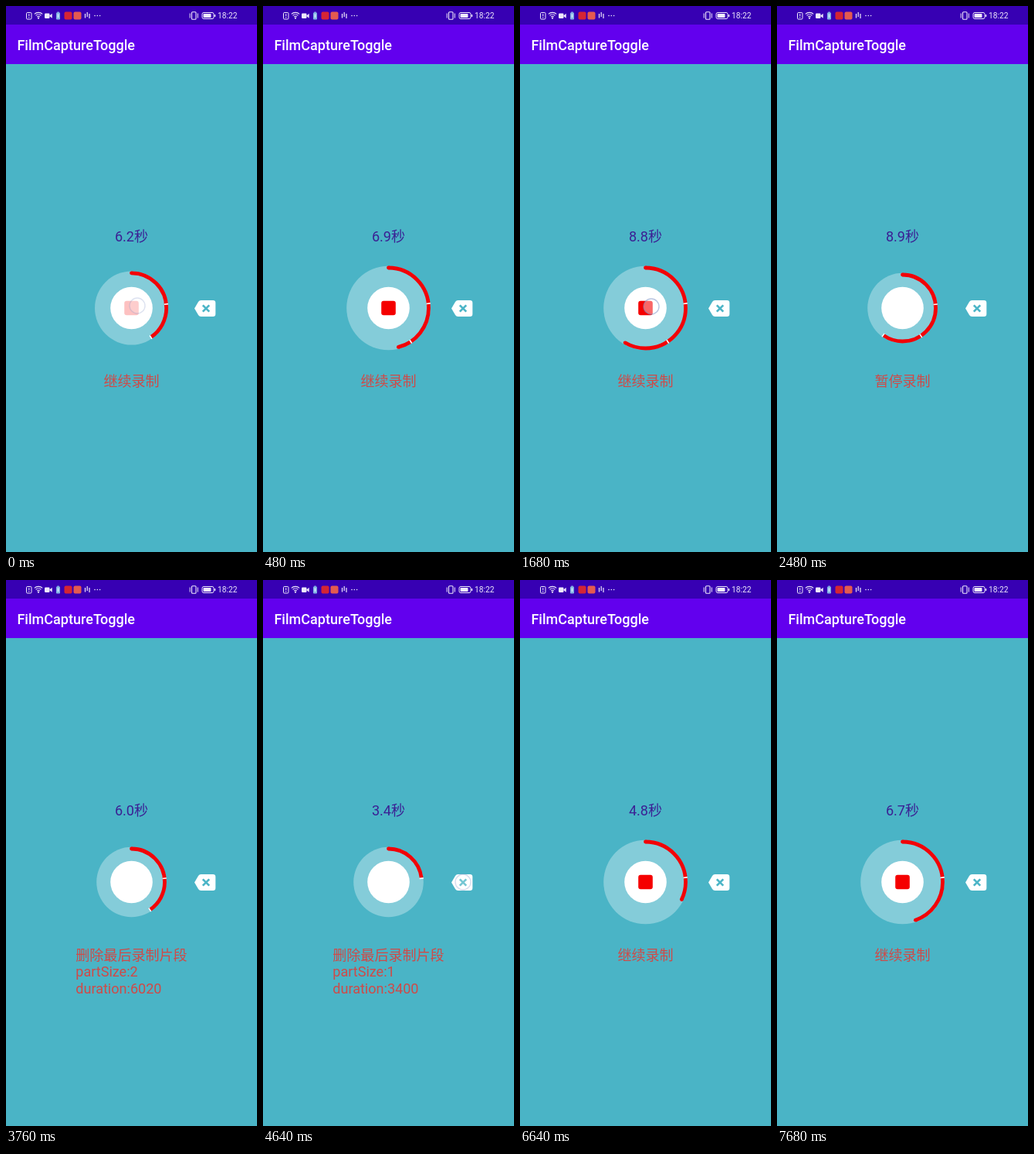
Write an HTML page with a canvas that moves like this. It is 325 px wide and 705 px high and loops after 7.76 s.

```html
<!DOCTYPE html>
<html lang="zh-CN">
<head>
<meta charset="utf-8">
<title>Recorder</title>
<style>
html, body { margin: 0; width: 100%; height: 100%; overflow: hidden; background: #4ab4c6; }
canvas { display: block; width: 325px; height: 705px; }
</style>
</head>
<body>
<canvas id="stage"></canvas>
<script>
const W = 325, H = 705, LOOP = 7760, STEP = 80;
const CX = 162.5, CY = 390;
const MAX_SECONDS = 15;
const FONT = 'Roboto, "Noto Sans CJK SC", "Noto Sans CJK", sans-serif';
const TEAL = '#4ab4c6', RED = '#f20207';

const canvas = document.getElementById('stage');
const ctx = canvas.getContext('2d');
const dpr = window.devicePixelRatio || 1;
canvas.width = W * dpr;
canvas.height = H * dpr;

const PARTS = [3.4, 6.02, 8.9];
const STOP = 1760, DELETE_1 = 3120, DELETE_2 = 4560, RESUME = 5683;
const GROW = 480;
const TAPS = [
  [-200, 170, 387],
  [1680, 170, 388],
  [3040, 259, 390],
  [4480, 259, 390],
  [5690, 171, 388]
];

const clamp = v => Math.max(0, Math.min(1, v));
const ease = v => (1 - Math.cos(Math.PI * clamp(v))) / 2;
const rad = deg => (deg - 90) * Math.PI / 180;
const degrees = sec => sec / MAX_SECONDS * 360;

// Piecewise linear track of [time, value] pairs.
function track(t, keys) {
  for (let i = 1; i < keys.length; i++) {
    const [a, va] = keys[i - 1], [b, vb] = keys[i];
    if (t <= b) return va + (vb - va) * clamp((t - a) / (b - a));
  }
  return keys[keys.length - 1][1];
}

function stateAt(t) {
  if (t < STOP) return {
    parts: 2, live: true, grow: ease((t + 158) / GROW),
    sec: track(t, [[0, 6.2], [960, 7.61], [STOP, 8.9]]),
    lines: ['继续录制']
  };
  if (t < DELETE_1) return {
    parts: 3, live: false, grow: 1 - ease((t - STOP) / GROW),
    sec: PARTS[2], lines: ['暂停录制']
  };
  if (t < RESUME) {
    const parts = t < DELETE_2 ? 2 : 1;
    const sec = PARTS[parts - 1];
    return {
      parts, sec, live: false, grow: 0,
      lines: ['删除最后录制片段', 'partSize:' + parts, 'duration:' + Math.round(sec * 1000)]
    };
  }
  return {
    parts: 1, live: true, grow: ease((t - RESUME) / GROW),
    sec: track(t, [[RESUME, 3.4], [5760, 3.43], [6640, 4.82], [7680, 6.71], [LOOP, 6.85]]),
    lines: ['继续录制']
  };
}

function disc(x, y, r, fill) {
  ctx.fillStyle = fill;
  ctx.beginPath();
  ctx.arc(x, y, r, 0, 7);
  ctx.fill();
}

function box(x, y, w, h, r, fill) {
  ctx.fillStyle = fill;
  ctx.beginPath();
  ctx.roundRect(x, y, w, h, r);
  ctx.fill();
}

function line(points, width, color) {
  ctx.strokeStyle = color;
  ctx.lineWidth = width;
  ctx.beginPath();
  points.forEach(([x, y]) => ctx.lineTo(x, y));
  ctx.stroke();
}

function arc(x, y, r, from, to, width, color) {
  ctx.strokeStyle = color;
  ctx.lineWidth = width;
  ctx.beginPath();
  ctx.arc(x, y, r, rad(from), rad(to));
  ctx.stroke();
}

function text(str, x, y, size, color, weight = 400, align = 'left') {
  ctx.font = `${weight} ${size}px ${FONT}`;
  ctx.textAlign = align;
  ctx.fillStyle = color;
  ctx.fillText(str, x, y);
}

function statusBar() {
  const ink = '#eee9fb';
  ctx.lineCap = 'butt';
  ctx.strokeStyle = ink;
  ctx.lineWidth = 1;
  ctx.beginPath();
  ctx.roundRect(26.5, 8.5, 6.5, 8.5, 1.2);
  ctx.stroke();
  line([[29.8, 10.3], [29.8, 13]], 1.1, ink);
  line([[29.8, 14], [29.8, 15.2]], 1.1, ink);

  [2.6, 5, 7.6].forEach(r => arc(42, 16, r, -43, 43, 1.1, ink));
  disc(42, 15.7, 1.1, ink);

  box(50, 9.5, 6.5, 6.5, 1.2, ink);
  ctx.beginPath();
  ctx.moveTo(56, 12.7);
  ctx.lineTo(59.7, 9.8);
  ctx.lineTo(59.7, 15.7);
  ctx.fill();

  box(65, 8.5, 5, 9, 1, '#84b5e6');
  box(66.3, 7.5, 2.4, 1.5, 0, '#84b5e6');
  line([[67.5, 10.5], [67.5, 15]], 1.2, '#e8f4ff');

  box(75.5, 7.5, 10, 10, 2, '#d52534');
  box(87.5, 7.5, 10, 10, 2, '#e45a50');

  line([[102.5, 10], [102.5, 15.5]], 1.2, ink);
  line([[105.2, 8], [105.2, 14]], 1.2, ink);
  line([[108, 10], [108, 16]], 1.2, ink);
  [115, 118.3, 121.6].forEach(x => disc(x, 12.5, 0.8, ink));

  ctx.strokeStyle = ink;
  ctx.lineWidth = 1.1;
  ctx.beginPath();
  ctx.roundRect(240.5, 7.8, 5.5, 9.4, 1);
  ctx.stroke();
  line([[238.2, 9.5], [238.2, 15.5]], 1, ink);
  line([[248.3, 9.5], [248.3, 15.5]], 1, ink);

  ctx.lineWidth = 1;
  ctx.beginPath();
  ctx.roundRect(254, 8.5, 15, 8, 2);
  ctx.stroke();
  box(255.5, 10, 10, 5, 0.8, ink);
  box(269.8, 11, 1.4, 3, 0.5, ink);
  text('18:22', 274, 16.2, 10.2, ink);
}

function deleteKey() {
  ctx.fillStyle = '#fff';
  ctx.beginPath();
  ctx.moveTo(244, 390.5);
  ctx.lineTo(249, 382);
  ctx.quadraticCurveTo(250.2, 380, 252.5, 380);
  ctx.lineTo(268, 380);
  ctx.quadraticCurveTo(271.3, 380, 271.3, 383.3);
  ctx.lineTo(271.3, 397.7);
  ctx.quadraticCurveTo(271.3, 401, 268, 401);
  ctx.lineTo(252.5, 401);
  ctx.quadraticCurveTo(250.2, 401, 249, 399);
  ctx.fill();
  line([[254.8, 386.3], [263.2, 394.7]], 2.6, TEAL);
  line([[263.2, 386.3], [254.8, 394.7]], 2.6, TEAL);
}

function recorder(s) {
  const outer = 45.3 + 9 * s.grow, r = outer - 2.3;
  disc(CX, CY, outer, 'rgba(255,255,255,0.32)');

  const last = degrees(PARTS[s.parts - 1]), now = degrees(s.sec);
  const running = s.live && now > last + 5;
  const end = running ? now : last + 1;
  ctx.lineCap = 'butt';
  arc(CX, CY, r, 0, end, 4.8, RED);
  disc(CX, CY - r, 2.4, RED);
  if (running) disc(CX + r * Math.cos(rad(end)), CY + r * Math.sin(rad(end)), 2.4, RED);
  for (const p of PARTS.slice(0, s.parts)) {
    const a = degrees(p);
    arc(CX, CY, r, a + 1, a + 2.9, 5.2, '#fff');
  }

  disc(CX, CY, 27.3, '#fff');
  ctx.globalAlpha = s.grow;
  box(CX - 9.3, CY - 9.3, 18.6, 18.6, 3, '#f50000');
  ctx.globalAlpha = 1;
}

function touches(t) {
  for (const [start, x, y] of TAPS) {
    const a = 1 - (t - start) / 400;
    if (a <= 0 || a > 1) continue;
    disc(x, y, 10, `rgba(255,255,255,${0.4 * a})`);
    arc(x, y, 10, 0, 360, 1.4, `rgba(130,150,200,${0.55 * a})`);
  }
}

function draw(t) {
  const s = stateAt(t);
  ctx.setTransform(dpr, 0, 0, dpr, 0, 0);
  box(0, 0, W, H, 0, TEAL);
  box(0, 24, W, 51, 0, '#6200ee');
  box(0, 0, W, 24, 0, '#3700b3');
  statusBar();
  text('FilmCaptureToggle', 14.4, 56.5, 18.06, '#fff', 500);

  text(s.sec.toFixed(1) + '秒', CX, 304, 18.06, '#3b2094', 400, 'center');
  const left = CX - (s.lines[0].length * 18.06) / 2;
  s.lines.forEach((str, i) => text(str, left, 491 + i * 21.4, 18.06, '#cf4a48'));

  recorder(s);
  deleteKey();
  touches(t);
}

const began = performance.now();
function frame() {
  const t = (performance.now() - began) % LOOP;
  draw(Math.floor(t / STEP) * STEP);
  requestAnimationFrame(frame);
}
frame();
</script>
</body>
</html>
```
